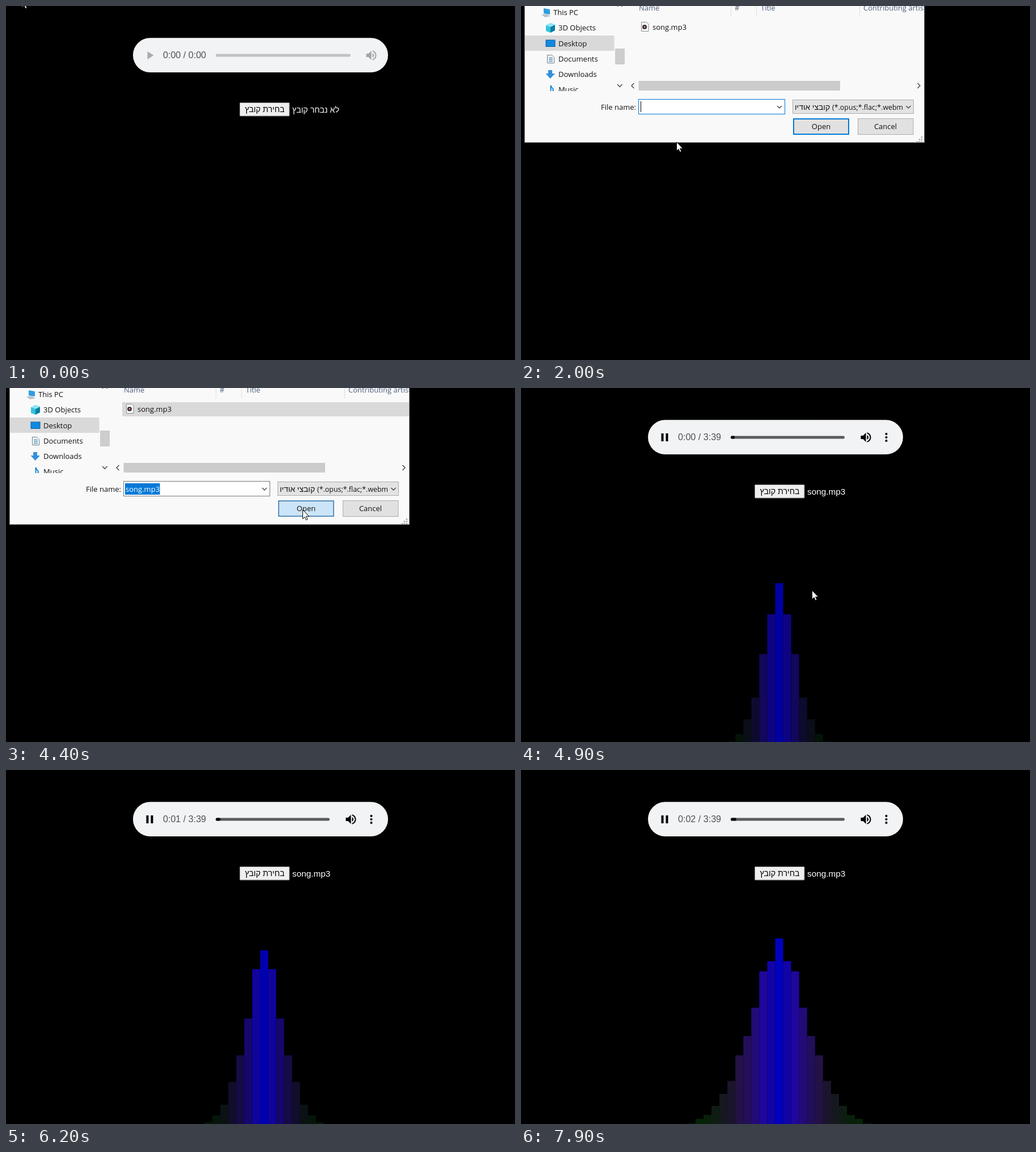
Recreate the animation shown at these times as an HTML page. Size 898 by 624 pixels, loop 8000 ms.

```html
<!DOCTYPE html>
<html lang="he">
<head>
<meta charset="utf-8">
<title>Audio visualizer</title>
<style>
  html, body { margin: 0; width: 100%; height: 100%; overflow: hidden; background: #000; }
  svg { display: block; width: 100%; height: 100%; }
  .page { font-family: "Liberation Sans", Arial, sans-serif; font-size: 15.3px; }
  .page .hebrew { font-size: 14.2px; }
  .time { font-size: 16.1px; fill: #505152; }
  .dialog { font-family: "Open Sans", "Noto Sans", sans-serif; font-size: 13px; fill: #111; }
  .head { fill: #4c607a; }
  .chev { fill: none; stroke: #444; stroke-width: 1.4; }
  .mid { text-anchor: middle; }
</style>
</head>
<body>
<svg viewBox="0 0 898 624" xmlns="http://www.w3.org/2000/svg">
  <defs>
    <path id="speaker" d="M3 9v6h4l5 5V4L7 9H3zm13.5 3c0-1.77-1.02-3.29-2.5-4.03v8.05c1.48-.73 2.5-2.25 2.5-4.02zM14 3.23v2.06c2.89.86 5 3.54 5 6.71s-2.11 5.85-5 6.71v2.06c4.01-.91 7-4.49 7-8.77s-2.99-7.86-7-8.77z"/>
    <clipPath id="nav"><rect x="6" width="176" height="150"/></clipPath>
    <clipPath id="frame"><rect x="6" width="706" height="241"/></clipPath>
  </defs>
  <rect width="898" height="624"/>
  <g id="bars"></g>

  <g class="page">
    <rect x="224" y="56.3" width="450" height="60.8" rx="30.4" fill="#f1f3f4"/>
    <text id="time" class="time" x="277" y="92"></text>
    <g id="idle">
      <path d="M249.5 80v14l11-7z" fill="#a9abac"/>
      <rect x="370" y="84.5" width="238" height="5" rx="2.5" fill="#c1c2c3"/>
      <use href="#speaker" x="632.5" y="75" fill="#a3a4a5"/>
    </g>
    <g id="playing">
      <path d="M247.5 80h4v14h-4zM255.5 80h4v14h-4z"/>
      <rect x="370" y="84.5" width="201" height="5" rx="2.5" fill="#5b5c5c"/>
      <rect id="played" x="370" y="84.5" height="5" rx="2" fill="#080808"/>
      <use href="#speaker" x="596.5" y="75"/>
      <path d="M644.5 81v0M644.5 87v0M644.5 93v0" stroke="#000" stroke-width="4.2" stroke-linecap="round"/>
    </g>
    <rect id="choose" x="412.5" y="170.5" width="87.5" height="23.5" rx="1" stroke="#767676"/>
    <text class="mid hebrew" x="456.5" y="186.5">בחירת קובץ</text>
    <text id="empty" class="hebrew" x="505" y="187.5" fill="#fff">לא נבחר קובץ</text>
    <text id="chosen" x="505" y="187.5" fill="#fff">song.mp3</text>
  </g>

  <g id="dialog" class="dialog" clip-path="url(#frame)">
    <rect x="6.5" y="-2" width="705" height="242.5" fill="#f9f9f9" stroke="#8a918e"/>
    <rect x="7" y="52" width="157.5" height="27" fill="#d9d9d9"/>
    <g clip-path="url(#nav)">
      <path d="M40 4l11 2v9l-11-2z" fill="#2f9de0"/>
      <path d="M36 15l9-1 7 4-10 2z" fill="#b9c3cb"/>
      <path d="M44 34l8-4 8 3v10l-8 4-8-3z" fill="#35c3df"/>
      <path d="M52 37l8-4v10l-8 4z" fill="#0d7fa8"/>
      <path d="M44 34l8-4 8 3-8 4z" fill="#8ce6f5"/>
      <rect x="44" y="60" width="16" height="11.5" fill="#0f8ae0" stroke="#0b5ea3"/>
      <path d="M46.5 86.5h8l4 4v10h-12z" fill="#fff" stroke="#6d7880"/>
      <path d="M49 91.5h7M49 94.5h7M49 97.5h7" stroke="#4a8fb5" stroke-width="1.5"/>
      <path d="M48 113h7v6h5l-8.5 9-8-9h4.500z" fill="#3490dc"/>
      <path d="M52.5 153V140q1 4 4 6 1 3-1 5" fill="none" stroke="#1686d9" stroke-width="2"/>
      <text x="57" y="16">This PC</text>
      <g id="places"></g>
    </g>
    <rect x="166" y="75" width="17" height="28" fill="#cdcdcd"/>
    <path class="chev" d="M170 138l4.3 4.5 4.3-4.5M170 1l1.5-1.5M178.500 1l-1.500-1.500M199.500 136l-4.500 4.500 4.500 4.500M699.500 136l4.500 4.500-4.500 4.500"/>
    <path d="M370.500 0v18M415.500 0v18M597.500 0v18" stroke="#dedede"/>
    <g class="head">
      <text x="208" y="8">Name</text><text x="377" y="8">#</text>
      <text x="423" y="8">Title</text><text x="604" y="8">Contributing artists</text>
    </g>
    <rect id="row" x="205" y="25" width="506" height="25"/>
    <path d="M212.500 28.500h9l3.500 3.500v12.500h-12.500z" fill="#fff" stroke="#8a8a8a"/>
    <circle cx="218" cy="37" r="4" fill="#3b2f38"/>
    <circle cx="218" cy="37" r="1.4" fill="#e8a07c"/>
    <text x="232" y="42">song.mp3</text>
    <rect x="207.500" y="132" width="355.500" height="17" fill="#cbcbcb"/>

    <text x="141" y="182.500">File name:</text>
    <rect id="nameBox" x="207.500" y="164.500" width="258" height="26" fill="#fff"/>
    <rect id="mark" x="210" y="168" width="61.500" height="20" fill="#0078d7"/>
    <text id="name" x="211" y="182.500">song.mp3</text>
    <path id="caret" d="M211.500 168v19" stroke="#000"/>
    <rect x="479.500" y="165.500" width="213" height="24" fill="#e3e3e3" stroke="#adadad"/>
    <text x="483" y="182.500" font-size="13.9">קובצי אודיו</text>
    <text x="549" y="182.500" font-size="12.400">(*.opus;*.flac;*.webm</text>
    <path class="chev" d="M452 176l4 4 4-4M679.500 176l4 4 4-4"/>
    <rect id="open" x="481" y="199" width="97" height="27"/>
    <text class="mid" x="529.500" y="217">Open</text>
    <rect x="594.500" y="198.500" width="97.500" height="28" fill="#e1e1e1" stroke="#adadad"/>
    <text class="mid" x="643" y="217">Cancel</text>
    <path d="M707 230v10M703 234v6M699 238v2" stroke="#aaa" stroke-width="2.500" stroke-dasharray="2.500 1.500"/>
  </g>

  <path id="cursor" d="M.5 .8V16.500L4.100 13.200 6.500 18.600 9 17.500 6.600 12.200H11.600z" fill="#fff" stroke="#000"/>
</svg>
<script>
const LOOP = 8000, STEP = 100;
const HOVERED = 1000, OPENED = 1900, LISTED = 2600, PICKED = 3400;
const AIMED = 4000, PRESSED = 4200, CLOSED = 4500, LOADED = 4700;
const SIDE = 18, BAR = 14.0625, MIDDLE = 448.5, FLOOR = 624;

// Stops of the pointer tip
const STOPS = [
  { at: 100, x: 28, y: -14 }, { at: 800, x: 468, y: 359 },
  { at: HOVERED, x: 460, y: 190 }, { at: 1300, x: 460, y: 190 },
  { at: 1700, x: 418, y: 343 }, { at: 2200, x: 196, y: 183 },
  { at: 2900, x: 272, y: 45 }, { at: PICKED, x: 272, y: 45 },
  { at: 3700, x: 410, y: 282 }, { at: AIMED, x: 523, y: 214 },
  { at: CLOSED, x: 523, y: 214 }, { at: 5000, x: 512, y: 373 },
  { at: 5800, x: 512, y: 373 }, { at: 6200, x: 530, y: 640 }
];

const el = id => document.getElementById(id);
const set = (id, attrs) => {
  for (const key in attrs) el(id).setAttribute(key, attrs[key]);
};
const show = (id, on) => set(id, { visibility: on ? 'visible' : 'hidden' });
const mix = (a, b, k) => a + (b - a) * k;
const share = (a, b, t) => Math.min(1, Math.max(0, (t - a) / (b - a)));
const ease = k => k * k * (3 - 2 * k);

function add(parent, name, attrs, text = '') {
  const node = document.createElementNS('http://www.w3.org/2000/svg', name);
  for (const key in attrs) node.setAttribute(key, attrs[key]);
  node.textContent = text;
  el(parent).append(node);
  return node;
}

['3D Objects', 'Desktop', 'Documents', 'Downloads', 'Music'].forEach((place, i) =>
  add('places', 'text', { x: 66, y: 43.2 + i * 27.3 }, place));

const bars = [];
for (let i = -SIDE; i <= SIDE; i++) {
  const bar = add('bars', 'rect', { x: MIDDLE + i * BAR, width: BAR });
  bars.push({ bar, n: Math.abs(i) });
}

// A bell that swells with the music and spreads as more pitches join in
function level(n, t) {
  const attack = share(LOADED, LOADED + 200, t);
  const swell = 280 + 69 * ease(share(5700, 6900, t)) - 22 * share(6900, 7900, t);
  const reach = 2.7 + share(5700, 7900, t) * 2.3;
  const ripple = n ? 1 + 0.05 * Math.sin(n * 2.4 + t / 170) : 1;
  const tail = Math.min(n, 8);
  return Math.max(0, attack * swell * ripple * Math.exp(-((n / reach) ** 1.6)) - tail);
}

function drawBars(t) {
  for (const { bar, n } of bars) {
    const h = Math.round(level(n, t));
    bar.setAttribute('y', FLOOR - h);
    bar.setAttribute('height', h);
    bar.setAttribute('fill', `rgb(${n * h / 17.5}, ${n * 3.5}, ${h * 0.58})`);
  }
}

function drawPlayer(t) {
  const loaded = t >= LOADED;
  const played = Math.max(0, t - LOADED - 100) / 1000;
  show('idle', !loaded);
  show('playing', loaded);
  show('empty', !loaded);
  show('chosen', loaded);
  el('time').textContent = loaded ? `0:0${Math.floor(played / 1.1)} / 3:39` : '0:00 / 0:00';
  set('played', { width: 7 + played * 0.92 });
  set('choose', { fill: t >= HOVERED && t < CLOSED ? '#e5e5e5' : '#efefef' });
}

function drawDialog(t) {
  const open = t >= OPENED && t < CLOSED;
  el('dialog').style.display = open ? '' : 'none';
  if (!open) return;
  const picked = t >= PICKED, pressed = t >= PRESSED, aimed = t >= AIMED;
  const rowFill = pressed ? '#d9d9d9' : picked ? '#cce8ff' : t >= LISTED ? '#e5f3ff' : 'none';
  set('row', { fill: rowFill });
  set('nameBox', { stroke: picked ? '#7a7a7a' : '#0078d7' });
  set('name', { fill: pressed ? '#fff' : '#111' });
  show('name', picked);
  show('mark', pressed);
  show('caret', !picked && (t - 1790) % 1060 < 530);
  set('open', {
    fill: aimed ? '#cce4f7' : '#e1e1e1',
    stroke: aimed ? '#005499' : '#0078d7',
    'stroke-width': aimed ? 1.2 : 2
  });
}

function drawCursor(t) {
  const next = STOPS.findIndex(stop => stop.at > t);
  const b = STOPS.at(next), a = next > 0 ? STOPS[next - 1] : b;
  const k = a === b ? 0 : ease(share(a.at, b.at, t));
  const x = Math.round(mix(a.x, b.x, k)), y = Math.round(mix(a.y, b.y, k));
  set('cursor', { transform: `translate(${x} ${y})` });
}

function render(ms) {
  const t = Math.floor(ms % LOOP / STEP) * STEP;
  drawBars(t);
  drawPlayer(t);
  drawDialog(t);
  drawCursor(t);
}

function loop() {
  render(performance.now());
  requestAnimationFrame(loop);
}
loop();
</script>
</body>
</html>
```
